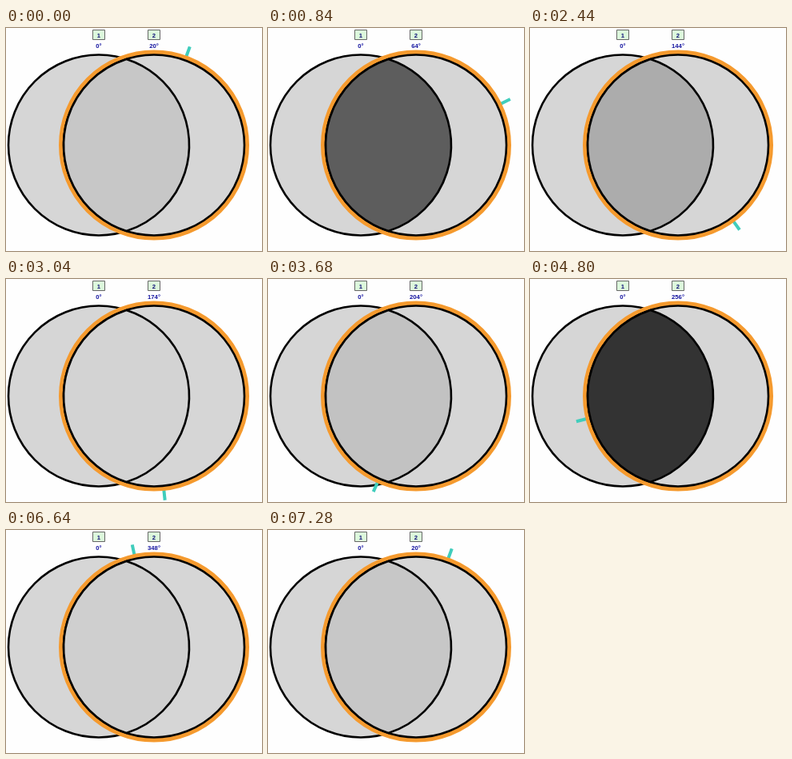
Recreate the animation shown at these times as an HTML page with a canvas. Size 320 by 279 pixels, loop 7.32 s.

```html
<!DOCTYPE html>
<html lang="en">
<head>
<meta charset="utf-8">
<title>Two polarizers</title>
<style>
html, body { margin: 0; width: 100%; height: 100%; overflow: hidden; background: #fefefe; }
canvas { display: block; width: 320px; height: 279px; }
</style>
</head>
<body>
<canvas id="stage"></canvas>
<script>
const W = 320, H = 279, LOOP = 7320, TICK = 40;
const CY = 146.5, R = 113, LEFT = 116, RIGHT = 185;
const TAU = Math.PI * 2;

// [time in ms, analyser angle in degrees]; the turn is nearly uniform
const TURN = [[0, 20], [840, 64], [2440, 144], [3680, 204], [4800, 256], [6080, 320], [7280, 380]];

const canvas = document.getElementById('stage');
const ctx = canvas.getContext('2d');
const scale = window.devicePixelRatio || 1;
canvas.width = W * scale;
canvas.height = H * scale;
ctx.scale(scale, scale);

function angleAt(ms) {
  const t = Math.min(Math.floor(ms / TICK + 1e-6) * TICK, 7280);
  let i = 0;
  while (i < TURN.length - 2 && t >= TURN[i + 1][0]) i++;
  const [t0, a0] = TURN[i], [t1, a1] = TURN[i + 1];
  const a = a0 + (a1 - a0) * (t - t0) / (t1 - t0);
  return Math.round(a / 2) * 2 % 360;
}

function ring(x, r, width, color) {
  ctx.beginPath();
  ctx.arc(x, CY, r, 0, TAU);
  ctx.lineWidth = width;
  ctx.strokeStyle = color;
  ctx.stroke();
}

function disc(x) {
  ctx.beginPath();
  ctx.arc(x, CY, R, 0, TAU);
  ctx.fillStyle = '#d6d6d6';
  ctx.fill();
  ring(x, R, 2.6, '#000');
}

function lens(angle) {
  const half = Math.acos((RIGHT - LEFT) / 2 / R);
  const v = Math.round(212 * Math.abs(Math.cos(angle * Math.PI / 180)));
  ctx.beginPath();
  ctx.arc(LEFT, CY, R, -half, half);
  ctx.arc(RIGHT, CY, R, Math.PI - half, Math.PI + half);
  ctx.closePath();
  ctx.fillStyle = `rgb(${v},${v},${v})`;
  ctx.fill();
  ctx.lineWidth = 2.6;
  ctx.lineJoin = 'round';
  ctx.strokeStyle = '#000';
  ctx.stroke();
}

function marker(angle) {
  ctx.save();
  ctx.translate(RIGHT, CY);
  ctx.rotate(angle * Math.PI / 180);
  ctx.fillStyle = '#40cdbc';
  ctx.fillRect(-2, -131, 4, 14);
  ctx.restore();
}

function label(x, name, angle) {
  ctx.fillStyle = '#dcf9dc';
  ctx.fillRect(x - 8, 2, 16, 13);
  ctx.lineWidth = 1;
  ctx.strokeStyle = '#666';
  ctx.strokeRect(x - 7.5, 2.5, 15, 12);
  ctx.font = 'bold 7.7px "Liberation Sans", Arial, sans-serif';
  ctx.textAlign = 'center';
  ctx.fillStyle = '#101078';
  ctx.fillText(name, x, 11.7);
  ctx.fillStyle = '#1414a0';
  ctx.fillText(angle + '°', x, 24.5);
}

function draw(ms) {
  const angle = angleAt(ms);
  ctx.fillStyle = '#fefefe';
  ctx.fillRect(0, 0, W, H);
  disc(LEFT);
  marker(angle);
  ring(RIGHT, 116.2, 5.6, '#f59a2e');
  disc(RIGHT);
  lens(angle);
  label(LEFT, '1', 0);
  label(RIGHT, '2', angle);
}

const start = performance.now();
function frame() {
  draw((performance.now() - start) % LOOP);
  requestAnimationFrame(frame);
}
frame();
</script>
</body>
</html>
```
